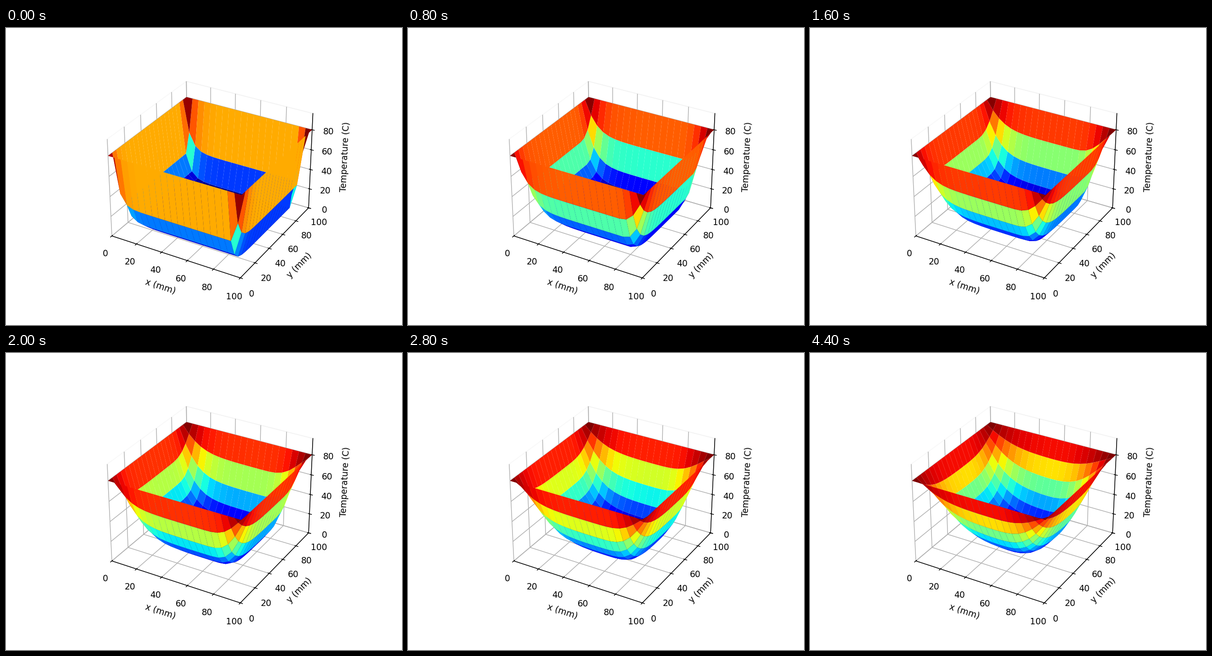
A matplotlib script for the animation above (4800 ms loop, 864 by 648 pixels).

```python
import numpy as np
import matplotlib.pyplot as plt
from matplotlib.animation import FuncAnimation

SIDE = 100       # plate width in mm
CELLS = 20       # cells along each side
T_EDGE = 80.0    # fixed edge temperature
T_START = 3.0    # initial interior temperature
SWEEPS = 12


def sweep(temp):
    """One in-place Gauss-Seidel pass over the interior nodes."""
    for i in range(1, CELLS):
        for j in range(1, CELLS):
            temp[i, j] = (temp[i - 1, j] + temp[i + 1, j]
                          + temp[i, j - 1] + temp[i, j + 1]) / 4


def solve():
    temp = np.full((CELLS + 1, CELLS + 1), T_EDGE)
    temp[1:-1, 1:-1] = T_START
    states = []
    for _ in range(SWEEPS):
        sweep(temp)
        states.append(temp.copy())
    return states


states = solve()
grid = np.linspace(0, SIDE, CELLS + 1)
X, Y = np.meshgrid(grid, grid)

fig = plt.figure(figsize=(6.4, 4.8), dpi=135)
ax = fig.add_subplot(projection="3d")
ax.set_xlim(0, SIDE)
ax.set_ylim(0, SIDE)
ax.set_zlim(0, 1.2 * T_EDGE)
ax.set_xlabel("x (mm)")
ax.set_ylabel("y (mm)")
ax.set_zlabel("Temperature (C)")
for axis in (ax.xaxis, ax.yaxis, ax.zaxis):
    axis.pane.fill = False


def update(n):
    for surface in list(ax.collections):
        surface.remove()
    return [ax.plot_surface(X, Y, states[n], cmap="jet")]


anim = FuncAnimation(fig, update, frames=SWEEPS, interval=400, repeat=True)
plt.show()
```
